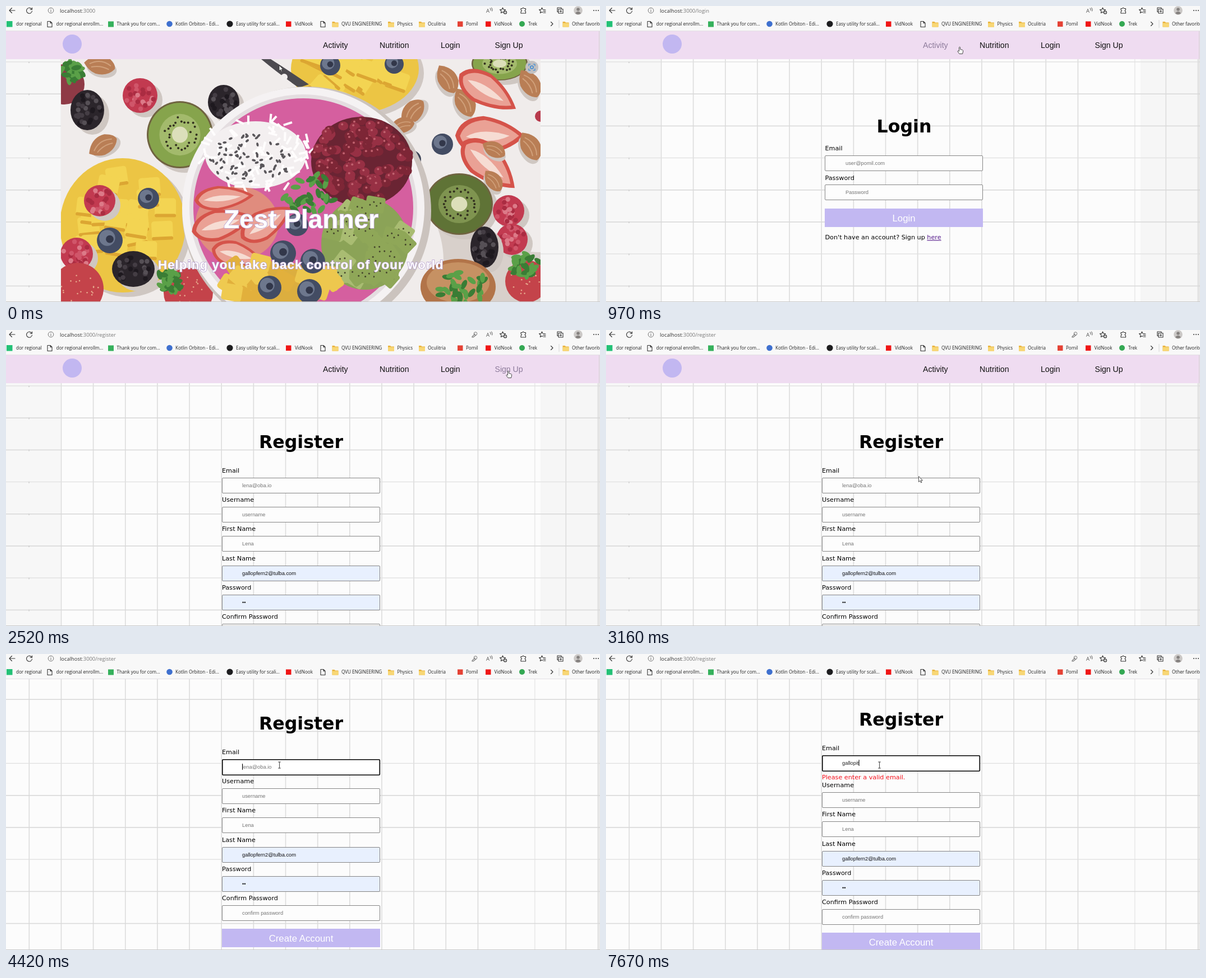
An HTML page that plays this animation: 1059 px wide and 529 px high, repeating every 8 s.

```html
<!DOCTYPE html>
<html lang="en">
<head>
<meta charset="utf-8">
<title>Planner walkthrough</title>
<style>
html, body { margin: 0; width: 100%; height: 100%; overflow: hidden; background: #fff; }
svg { display: block; width: 1059px; height: 529px; }
text { white-space: pre; }
.ui { font-family: "Open Sans", "Noto Sans", sans-serif; }
.arial { font-family: "Liberation Sans", Arial, sans-serif; }
.verdana { font-family: "DejaVu Sans", Verdana, sans-serif; }
.line { fill: none; stroke: #333; stroke-width: 1.1; stroke-linecap: round; stroke-linejoin: round; }
.hero { font-weight: bold; fill: #fff; stroke: #b79fd0; stroke-width: 1.6px; paint-order: stroke; }
</style>
</head>
<body>
<svg id="stage" viewBox="0 0 1059 529" xmlns="http://www.w3.org/2000/svg"></svg>
<script>
const stage = document.getElementById('stage');
const MAIL = 'gallopfern2@tulba.com', TYPED = 'gallopit';

// ---- drawing helpers ----
const rect = (x, y, w, h, fill, more = '') =>
  `<rect x="${x}" y="${y}" width="${w}" height="${h}" fill="${fill}" ${more}/>`;
const oval = (x, y, rx, ry, fill, more = '') =>
  `<ellipse cx="${x}" cy="${y}" rx="${rx}" ry="${ry}" fill="${fill}" ${more}/>`;
const disc = (x, y, r, fill, more) => oval(x, y, r, r, fill, more);
const path = (d, fill, more = '') => `<path d="${d}" fill="${fill}" ${more}/>`;
const line = (d, more = '') => `<path class="line" d="${d}" ${more}/>`;
const text = (x, y, s, font, size, fill = '#000', more = '') =>
  `<text class="${font}" x="${x}" y="${y}" font-size="${size}" fill="${fill}" ${more}>${s}</text>`;
const group = (id, body, more = '') => `<g id="${id}" ${more}>${body}</g>`;
const put = (x, y, body, turn = 0, sx = 1, sy = sx) =>
  `<g transform="translate(${x} ${y}) rotate(${turn}) scale(${sx} ${sy})">${body}</g>`;
const range = (n, f) => Array.from({ length: n }, (_, i) => f(i)).join('');

let seed = 11;
const rnd = () => (seed = (seed * 16807) % 2147483647) / 2147483647;
const scatter = (n, cx, cy, rx, ry, f) => range(n, () => {
  const a = rnd() * 6.283, r = Math.sqrt(rnd());
  return f(cx + Math.cos(a) * r * rx, cy + Math.sin(a) * r * ry);
});

// ---- photo ----
const shade = (x, y, rx, ry) => oval(x + 9, y + 8, rx, ry, '#cfc7c2');
const berry = (x, y, rx, ry, base, tones) => shade(x, y, rx, ry) + oval(x, y, rx, ry, base) +
  scatter(26, x, y, rx * .82, ry * .82, (a, b) => disc(a, b, 4.2, tones[rnd() * tones.length | 0]));
const blackberry = (x, y, rx, ry) => berry(x, y, rx, ry, '#2b252b', ['#443d44', '#565056', '#1e191f']);
const raspberry = (x, y, r) => berry(x, y, r, r, '#c23a50', ['#d0566a', '#dc7a88', '#ab2c42']);
const blueberry = (x, y, r) => disc(x, y, r, '#434c63') + disc(x - r * .2, y - r * .2, r * .62, '#6d778d') +
  disc(x, y - r * .1, r * .3, '#32374a');
const almond = (x, y, turn, k = 1) => put(x, y, oval(5, 6, 27, 16, '#cfc7c2') +
  path('M-28 2Q-12-22 12-16Q28-8 28 2Q18 18-4 17Q-18 14-28 2Z', '#b97e55') +
  path('M-18 2Q0-12 20-2M-14 7Q2 0 18 5', 'none', 'stroke="#d0a07a" stroke-width="2"'), turn, k);
const kiwi = (x, y, rx, ry, flesh = '#86a44c', pale = '#a3ba6c') => shade(x, y, rx, ry) + oval(x, y, rx, ry, '#6f6340') +
  oval(x, y, rx * .95, ry * .95, flesh) + oval(x, y, rx * .62, ry * .62, pale) +
  range(26, i => {
    const a = i * .2417, r = .3 + rnd() * .24;
    return disc(x + Math.cos(a) * r * rx, y + Math.sin(a) * r * ry, 2, '#33311f');
  }) + oval(x, y, rx * .24, ry * .24, '#dcdfba');
const mango = (x, y, rx, ry, turn) => shade(x, y, rx, ry) + oval(x, y, rx, ry, '#ecc544') +
  scatter(22, x, y, rx * .74, ry * .74, (a, b) =>
    put(a, b, rect(-19, -17, 38, 34, '#f3d452', 'rx="5"') + rect(-19, 11, 38, 6, '#dca632', 'rx="3"'), turn + rnd() * 24));
const slice = (x, y, turn, k = 1, ky = k) => put(x, y, path('M-58-4Q-48-30-8-30Q32-22 60 4Q30 26-16 28Q-52 22-58-4Z', '#d5534a') +
  path('M-50-3Q-40-24-6-24Q28-16 50 3Q24 20-14 22Q-45 17-50-3Z', '#eaa195') +
  path('M-40-1Q-12-14 34 2Q0 14-40-1Z', '#f6dcd3'), turn, k, ky);
const strawberry = (x, y, r) => disc(x, y, r, '#c4434a') +
  scatter(20, x, y, r * .8, r * .8, (a, b) => disc(a, b, 1.3, '#e6a88c'));
const leaf = (x, y, r) => scatter(32, x, y, r, r * .75, (a, b) =>
  put(a, b, oval(0, 0, 9, 4.5, rnd() > .5 ? '#3a7d35' : '#5aa048'), rnd() * 180));

const bowl = disc(536, 366, 222, '#cbc3be') + disc(530, 361, 216, '#f5f2f3') + disc(530, 361, 203, '#e4dde0') +
  disc(530, 361, 196, '#d55f9f') +
  oval(412, 388, 74, 66, '#e08c7e') + oval(480, 500, 84, 44, '#dcae3f') + oval(640, 425, 78, 82, '#8ba357') +
  oval(445, 266, 90, 60, '#f3eff0') + scatter(85, 447, 266, 100, 68, (a, b) => put(a, b, rect(-8, -2, 16, 4, '#fffdfd'), rnd() * 180)) +
  scatter(75, 436, 274, 74, 44, (a, b) => put(a, b, oval(0, 0, 3.5, 2, '#5a575b'), rnd() * 180)) +
  oval(634, 278, 90, 80, '#6a2433') +
  scatter(110, 634, 278, 86, 77, (a, b) => oval(a, b, 9, 8, rnd() > .5 ? '#973044' : '#7d2636') + disc(a - 2, b - 3, 2, '#c0616e')) +
  slice(388, 343, -8, .9, .75) + slice(385, 390, -18, .95) + slice(464, 388, -35, .9) + slice(412, 445, 10, .8) +
  scatter(34, 642, 425, 70, 76, (a, b) => put(a, b, rect(-17, -14, 34, 28, rnd() > .5 ? '#a9bc72' : '#8fa758', 'rx="4"') +
    range(4, i => disc(i * 6 - 9, 2 - i % 2 * 6, 1.5, '#45452c')), rnd() * 60)) +
  scatter(16, 440, 492, 58, 36, (a, b) => put(a, b, rect(-18, -15, 36, 30, rnd() > .5 ? '#efca50' : '#e2b03c', 'rx="5"'), rnd() * 60)) +
  scatter(8, 555, 492, 44, 28, (a, b) => put(a, b, rect(-16, -14, 32, 28, '#edc74e', 'rx="5"'), rnd() * 60)) +
  leaf(538, 332, 50) + blueberry(519, 391, 20) + blueberry(494, 442, 23) + blueberry(547, 456, 22) +
  blueberry(470, 503, 21) + blueberry(541, 510, 22);

const photo = rect(98, 95, 855, 434, '#f0eceb') +
  path('M735 330Q810 440 760 529H953V440Q850 440 735 330Z', '#d8d0cb') +
  disc(104, 140, 36, '#8f3a46') + leaf(112, 118, 24) + blackberry(145, 186, 30, 36) + almond(167, 105, 12) +
  raspberry(239, 160, 31) + blackberry(388, 172, 28, 31) + kiwi(310, 230, 59, 60) + almond(172, 249, -28) +
  mango(208, 392, 112, 120, -12) + raspberry(167, 348, 28) + blueberry(254, 344, 19) + blueberry(185, 419, 23) +
  blackberry(227, 470, 38, 32) + raspberry(126, 443, 29) + strawberry(128, 505, 46) + strawberry(325, 512, 44) + leaf(290, 492, 24) +
  mango(622, 112, 114, 80, 18) + blueberry(578, 106, 18) + blueberry(692, 104, 17) +
  path('M455 95L472 95Q505 116 540 140L522 146Q490 124 455 95Z', '#4d4b50') + disc(496, 127, 6, '#f1eeee') +
  almond(724, 190, -48) + almond(706, 213, -12, .8) + disc(724, 274, 16, '#3d4356') +
  kiwi(880, 103, 50, 30) + almond(787, 130, 62) + almond(818, 172, 64) + slice(858, 152, 28) +
  slice(862, 232, -4, 1.05, 1.2) + slice(860, 283, 38, 1.05, 1.1) + almond(870, 256, 30, .8) + almond(935, 250, 62) +
  almond(869, 312, 55, .8) + almond(934, 138, 60) + blueberry(778, 247, 19) + disc(953, 197, 10, '#b83a4c') +
  kiwi(808, 354, 60, 55, '#5f7336', '#7f9450') + raspberry(896, 366, 28) + raspberry(902, 417, 28) + blackberry(853, 431, 25, 37) +
  oval(806, 502, 67, 50, '#b27449') + oval(806, 494, 56, 36, '#c69163') + leaf(812, 502, 44) +
  strawberry(928, 492, 38) + leaf(926, 462, 26) + bowl;

// ---- page parts ----
const rows = [...Array(11)].map((_, i) => 100 + 57.2 * i);
const column = (x, tone = '#dcdcdc') => rect(x, 45, 1.6, 680, tone);
const tile = 957;
const grid = rect(0, 45, 1059, 680, '#fcfcfc') +
  range(15, i => column(40.5 + 57.15 * i)) +
  group('edges', rect(0, 45, 97, 484, '#f7f7f7') + rect(953, 45, 106, 484, '#f6f6f6') +
    rows.map(y => rect(40, y - 1, 2, 3, '#cfcfcf')).join('')) +
  column(942, '#eaeaea') + column(40.5 + tile) + column(97.6 + tile) +
  rows.map((y, i) => rect(0, y - .8, 1059, i % 3 ? 1.6 : 1.3, i % 3 ? '#d9d9d9' : '#e0e0e0')).join('');

const links = [['Activity', 565], ['Nutrition', 666], ['Login', 775], ['Sign Up', 871.5]];
const nav = rect(0, 45, 1059, 50, '#efdcf1') + disc(118, 68, 17, '#c2b7f1') +
  links.map(([s, x], i) => text(x, 74.5, s, 'arial', 14.1, '#111', `id="link${i}"`)).join('');

const lens = disc(937.5, 109.5, 11.5, '#c3c0c0') + disc(937.5, 109.5, 2.6, 'none', 'stroke="#2f86d6" stroke-width="1.4"') +
  line('M932 107V104H935M940 104H943V107M943 112V115H940M935 115H932V112', 'style="stroke:#2f86d6"');
const home = `<g clip-path="url(#frame)">${photo}</g>` +
  text(526, 397, 'Zest Planner', 'arial hero', 46, '#fff', 'text-anchor="middle"') +
  text(271, 469.5, 'Helping you take back control of your world', 'arial hero', 22.4, '#fff', 'letter-spacing="1"') +
  group('lens', lens);

const label = (x, y, s, fill) => text(x, y, s, 'verdana', 11.2, fill);
const small = (x, y, s, fill = '#757575', more) => text(x, y, s, 'arial', 9.33, fill, more);
const box = (x, y, fill = '#fdfdfd') => rect(x + .5, y + .5, 281, 27, fill, 'stroke="#858585" rx="1.5"');
const filled = '#e8f0fe';
const button = (x, y, s) => rect(x, y, 282, 33, '#c2b8f2') +
  text(x + 141, y + 22.5, s, 'arial', 16.8, '#fff', 'text-anchor="middle"');
const title = (x, y, s) => text(x, y, s, 'verdana', 31.6, '#000', 'text-anchor="middle" font-weight="bold"');

const login = title(531.5, 226, 'Login') + label(390.5, 258, 'Email') + box(390, 267) +
  label(390.5, 310.5, 'Password') + box(390, 319) +
  group('empty', small(427, 284, 'user@pomil.com') + small(427, 336.3, 'Password')) +
  group('auto', box(390, 267, filled) + box(390, 319, filled) + small(427, 284, MAIL, '#111') + small(427, 336.3, '••', '#000')) +
  button(390, 362, 'Login') +
  label(390.5, 417.3, 'Don\'t have an account? Sign up <tspan fill="#551a8b" text-decoration="underline">here</tspan>');

const fields = [['Username', 'username'], ['First Name', 'Lena'], ['Last Name', MAIL, 1], ['Password', '••', 1], ['Confirm Password', 'confirm password']];
const register = group('upper', title(526, 211, 'Register') + label(385, 254.7, 'Email') + box(385, 264) +
    rect(385.8, 264.8, 280.5, 27.4, '#fff', 'id="ring" stroke="#000" stroke-width="1.6" rx="1.5"') +
    small(421, 281.4, 'lena@oba.io', '#757575', 'id="hint"') + small(421, 281.4, '', '#222', 'id="typed"') +
    rect(421, 272, 1, 11, '#000', 'id="caret"')) +
  group('lower', fields.map(([s, v, on], i) => {
    const y = Math.round(316.2 + 52.25 * i);
    return label(385, y - 9, s) + box(385, y, on && filled) + small(421, y + 17.2, v, on && '#111');
  }).join('') + button(385, 567, 'Create Account')) +
  group('error', label(385, 300, 'Please enter a valid email.', '#f5101c'));

// ---- browser bar ----
const sheet = x => line(`M${x} 27.5H${x + 5}L${x + 8} 30.5V37.5H${x}ZM${x + 5} 27.5V30.5H${x + 8}`);
const folder = x => path(`M${x} 28h4l1.5 1.5h5.5v8h-11z`, '#e9b23c') + rect(x, 30.5, 11, 7, '#f8d775', 'rx=".8"');
const mark = (x, s) => text(x, 35, s, 'ui', 8.1, '#222');
const star = (x, y) => line(`M${x} ${y - 5}l1.5 3.2 3.5.4-2.6 2.4.7 3.5-3.1-1.8-3.1 1.8.7-3.5-2.6-2.4 3.5-.4z`);
const bar = rect(0, 0, 1059, 44, '#f8f8f8') + rect(0, 44, 1059, 1, '#e3dfe5') +
  line('M16 8H6M10.5 3.5L6 8L10.5 12.5') + line('M46 6A5 5 0 1 0 46.5 9M46.5 3V6.3H43') +
  disc(80, 8, 4.8, 'none', 'stroke="#777"') + line('M80 7.5V10.5M80 5.4V5.6', 'style="stroke:#777"') +
  `<text class="ui" x="96" y="11.5" font-size="9.4" fill="#333">localhost<tspan fill="#777" id="url"></tspan></text>` +
  group('key', line('M836 7L831 12V13H833L838 9', 'style="stroke:#777"') + disc(837, 6.5, 2.8, 'none', 'stroke="#777"')) +
  text(856, 12, 'A', 'ui', 9.5, '#555') + line('M863 4Q865 6 864 8M865.5 3Q868 6 866.5 9', 'style="stroke:#777"') +
  star(885.5, 8) + disc(890, 11.5, 3.2, '#555') + line('M888.4 11.5H891.6M890 9.9V13.1', 'style="stroke:#fff"') +
  line('M918 4.5H920.5Q922 1.5 923.5 4.5H926.5V7Q923.5 8.5 926.5 10V13H918V10Q921 8.5 918 7Z') +
  star(955.5, 8) + rect(957, 6.5, 6, 7, '#f8f8f8') + line('M958 7H962M958 9.5H962M958 12H962') +
  line('M985 10.5H983V3H990V5M985 5.5H993V13H985ZM989 7.5V11M987.2 9.2H990.8') +
  disc(1020, 8, 7.8, '#cbc8c6') + disc(1020, 6, 2.8, '#85817f') + path('M1015 13Q1020 6.5 1025 13Q1020 17 1015 13Z', '#85817f') +
  [1048, 1052, 1056].map(x => disc(x, 8, 1, '#333')).join('') +
  rect(1, 27, 10.5, 10.5, '#23c176') + mark(18, 'dor regional') + sheet(74) + mark(89.5, 'dor regional enrollm...') +
  rect(182, 27.5, 10, 10, '#36b15c') + mark(197.5, 'Thank you for com...') +
  disc(291.5, 32, 5.3, '#3f70cf') + mark(302, 'Kotlin Orbiton - Edi...') +
  disc(399, 32, 5.6, '#1d1d1f') + mark(410, 'Easy utility for scali...') +
  rect(499, 27.5, 9.5, 9.5, '#f01616') + mark(515, 'VidNook') + sheet(561) +
  folder(581.5) + mark(598, 'QVU ENGINEERING') + folder(681) + mark(697.5, 'Physics') +
  folder(736) + mark(752, 'Oculitria') + rect(805, 27.5, 9.5, 9.5, '#e54235') + mark(820, 'Pomil') +
  rect(855, 27.5, 9.5, 9.5, '#f01616') + mark(870.5, 'VidNook') + disc(920, 32, 5, '#34a853') + mark(931, 'Trek') +
  line('M971.5 28.5L975 32L971.5 35.5') + rect(985.5, 25, 1, 14, '#d6d6d6') + folder(992.5) + mark(1009, 'Other favorites');

const cursors = {
  arrow: path('M0 0V10L2.4 7.8L4 11.4L5.5 10.7L4 7.3H7Z', '#fff', 'stroke="#222" stroke-width=".8"'),
  hand: path('M-1.5 5V.8Q-.5-.6.6.8V4.5L4.6 5.5Q6 6 5.6 8L4.6 12.5H-1L-4 8.5Q-4.2 6.8-2.6 7.2L-1.5 8Z', '#fff', 'stroke="#333" stroke-width=".9"'),
  beam: line('M-2-5.5H2M0-5.5V5.5M-2 5.5H2', 'style="stroke-width:1;stroke:#444"')
};

stage.innerHTML = '<defs><clipPath id="frame">' + rect(98, 95, 855, 434, '#000') + '</clipPath></defs>' +
  group('page', grid + nav + group('home', home) + group('login', login) + group('register', register)) +
  bar + rect(1057, 45, 1, 484, '#d2d2d2') + rect(0, 528, 1059, 1, '#c9c9c9') +
  group('cursor', Object.keys(cursors).map(k => group(k, cursors[k])).join(''));

// ---- timeline: each step changes part of the state ----
const at = (x, y, more) => ({ x, y, ...more });
const steps = [
  [0, at(487, 106, { page: 'home', cur: 'arrow', hover: -1, lens: 1, auto: 0, scroll: 0, focus: 0, typed: 0, caret: 0 })],
  [120, at(550, 97)],
  [240, at(640, 84, { lens: 0 })],
  [360, at(709, 59, { cur: 'hand', hover: 1 })],
  [510, at(646, 69)],
  [660, at(631, 73, { hover: 0 })],
  [970, { page: 'login' }],
  [1120, at(655, 72, { hover: 1 })],
  [1240, at(688, 71)],
  [1360, { auto: 1 }],
  [1480, at(722, 69)],
  [1600, at(770, 67, { hover: 2 })],
  [1720, at(808, 66)],
  [2000, at(839, 68)],
  [2150, at(878, 71, { hover: 3 })],
  [2270, at(896, 73)],
  [2520, { page: 'register' }],
  [2640, at(845, 100, { cur: 'arrow', hover: -1 })],
  [2760, at(690, 172)],
  [2880, at(576, 234)],
  [3020, at(557.5, 261.5)],
  [3290, at(538, 232, { scroll: 38 })],
  [3440, at(509, 197.5, { scroll: 76, cur: 'beam' })],
  [3590, at(495, 200)],
  [3710, at(487.5, 199.5, { focus: 1, caret: 1 })],
  [3860, at(487.5, 198.5)],
  [4010, { caret: 0 }],
  [4420, { caret: 1 }],
  [4790, { typed: 1 }],
  [4930, { typed: 2 }],
  [5050, { typed: 3 }],
  [5300, { caret: 0 }],
  [5550, { caret: 1 }],
  [5670, { typed: 4 }],
  [5790, { typed: 5 }],
  [6300, { typed: 6 }],
  [6440, { typed: 8 }],
  [6820, { caret: 0 }],
  [7180, { caret: 1 }],
  [7420, { caret: 0 }],
  [7670, { caret: 1 }]
];
let sum = {};
const states = steps.map(([time, change]) => ({ time, ...(sum = { ...sum, ...change }) }));

const el = id => document.getElementById(id);
const show = (id, on) => { el(id).style.display = on ? '' : 'none'; };
const move = (id, x, y) => el(id).setAttribute('transform', `translate(${x} ${y})`);

function render(s) {
  ['home', 'login', 'register'].forEach(p => show(p, p === s.page));
  Object.keys(cursors).forEach(k => show(k, k === s.cur));
  links.forEach((_, i) => el('link' + i).setAttribute('fill', i === s.hover ? '#8d7b9b' : '#111'));
  el('url').textContent = ':3000' + (s.page === 'home' ? '' : '/' + s.page);
  show('lens', s.lens);
  show('key', s.auto);
  show('auto', s.auto);
  show('empty', !s.auto);
  show('edges', !s.scroll);
  show('ring', s.focus);
  show('error', s.typed);
  show('hint', !s.typed);
  show('caret', s.caret);
  move('page', 0, -s.scroll);
  move('cursor', s.x, s.y);
  move('upper', 0, s.typed ? -7 : 0);
  move('lower', 0, s.typed ? 7 : 0);
  el('typed').textContent = TYPED.slice(0, s.typed);
  el('caret').setAttribute('x', 421 + (s.typed ? el('typed').getComputedTextLength() : 0));
}

const start = performance.now();
let shown;
function tick() {
  const t = (performance.now() - start) % 8000;
  const state = states.findLast(s => s.time <= t) || states[0];
  if (state !== shown) render(shown = state);
  requestAnimationFrame(tick);
}
tick();
</script>
</body>
</html>
```
